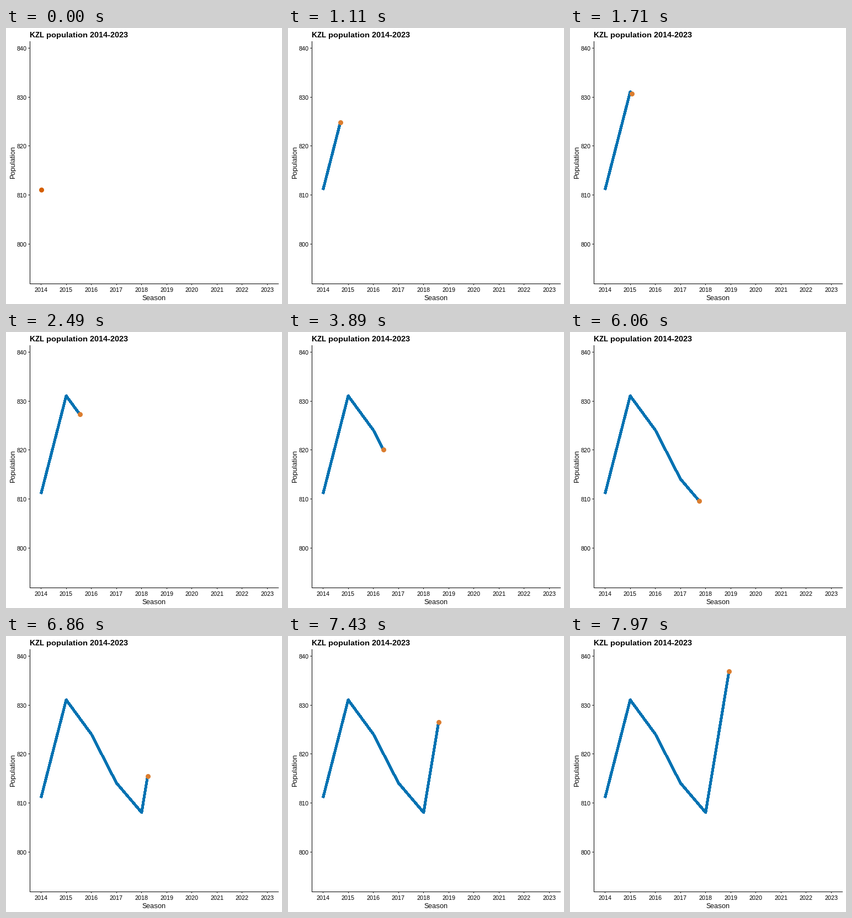
These frames come from a looping animation (500x500 px, 8 s). A matplotlib script:

```python
import matplotlib.pyplot as plt
import numpy as np
from matplotlib.animation import FuncAnimation

SIZE, DPI = 500, 72
FRAMES, INTERVAL = 400, 20
STEP_MS = 1000 / 35
STEPS_PER_YEAR = 56.6
LEFT, RIGHT, TOP, BOTTOM = 43, 494, 24.8, 463.7
X_MIN, X_MAX, Y_MIN, Y_MAX = 2013.55, 2023.45, 791.75, 841.25
BLUE, ORANGE, PALE_ORANGE = "#0072B2", "#D55E00", "#DB7D2F"

years = np.arange(2014, 2020)
population = np.array([811, 831, 824, 814, 808, 839])

# Whole-pixel glyph hinting keeps the small text crisp
plt.rcParams.update({"font.family": "Liberation Sans",
                     "text.hinting": "native", "text.hinting_factor": 1})


def px(year):
    return LEFT + (year - X_MIN) / (X_MAX - X_MIN) * (RIGHT - LEFT)


def py(value):
    return TOP + (Y_MAX - value) / (Y_MAX - Y_MIN) * (BOTTOM - TOP)


fig = plt.figure(figsize=(SIZE / DPI, SIZE / DPI), dpi=DPI, facecolor="white")
ax = fig.add_axes([0, 0, 1, 1])
ax.set_xlim(0, SIZE)
ax.set_ylim(SIZE, 0)
ax.axis("off")


def rule(xs, ys, color="black"):
    ax.plot(xs, ys, color=color, lw=1, solid_capstyle="butt", snap=False)


def label(x, y, text, size, **kw):
    ax.text(x, y, text, fontsize=size, color="black", va="baseline", **kw)


rule([43.5, 43.5], [24, 464])
rule([43, 494], [463.5, 463.5])

for year in range(2014, 2024):
    x = np.floor(px(year)) + 0.5
    rule([x, x], [464, 466], "#333333")
    label(px(year) - 0.3, 478, str(year), 11, ha="center")

for value in range(800, 841, 10):
    y = round(py(value)) + 0.5
    rule([40, 43], [y, y], "#333333")
    label(38, y + 4.5, str(value), 11, ha="right")

label(42.6, 17, "KZL population 2014-2023", 14, weight="bold")
label(267.5, 493, "Season", 12, ha="center")
label(16, 243.5, "Population", 12, ha="center", rotation=90,
      rotation_mode="anchor")

line, = ax.plot([], [], color=BLUE, lw=4, antialiased=False,
                solid_capstyle="butt", solid_joinstyle="round")
dot, = ax.plot([], [], ls="", marker="o", ms=9, mew=0, antialiased=False)


def draw(i):
    step = int((i * INTERVAL + 15) / STEP_MS)
    now = 2014 + step / STEPS_PER_YEAR
    value = np.interp(now, years, population)
    past = years <= now
    line.set_data(px(np.append(years[past], now)),
                  py(np.append(population[past], value)))
    line.set_visible(step > 0)
    dot.set_data([px(now)], [py(value)])
    dot.set_color(PALE_ORANGE if step else ORANGE)
    return line, dot


anim = FuncAnimation(fig, draw, frames=FRAMES, interval=INTERVAL,
                     init_func=lambda: draw(0), repeat=True, repeat_delay=0)
plt.show()
```
